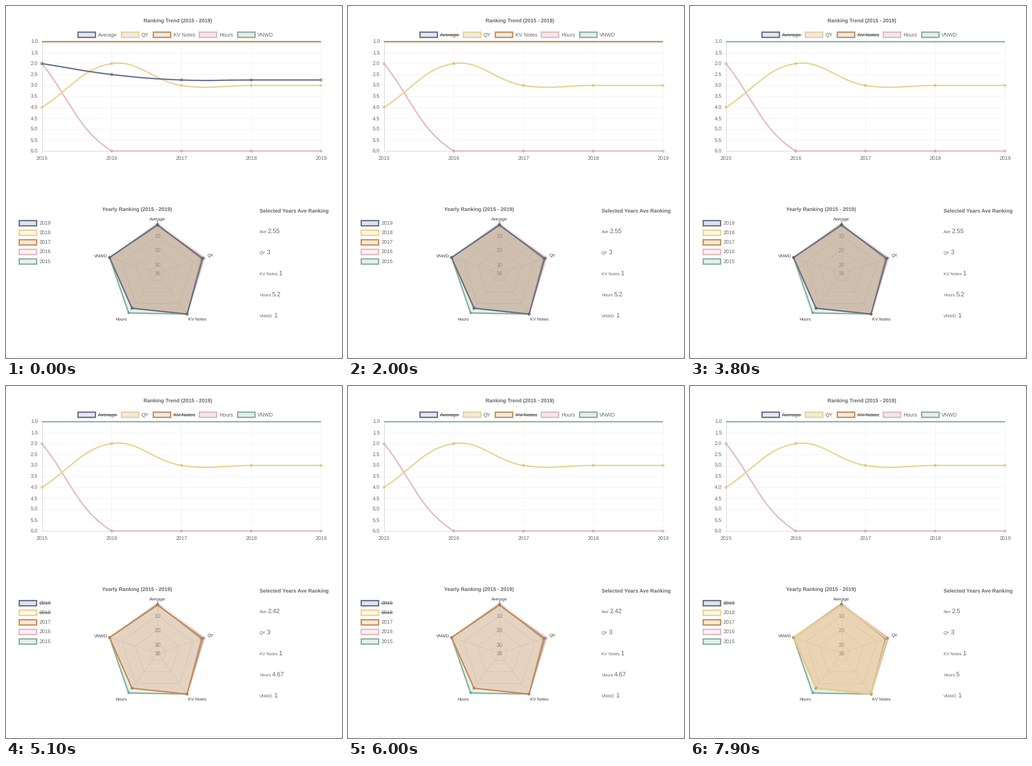
These frames come from a looping animation (640x668 px, 8 s). A matplotlib script:

```python
import numpy as np
import matplotlib.pyplot as plt
from matplotlib.animation import FuncAnimation
from matplotlib.patches import Circle, FancyBboxPatch, Polygon, Rectangle, PathPatch
from matplotlib.path import Path

W, H, DPI = 640, 668, 100
STEP, FRAMES = 100, 80
S = 0.826                      # chart units to pixels
PT = 72 / DPI
FONT, SMALL, LINE = 12 * S, 10 * S, 3 * S
GREY, GRID, WEB = "#666666", "#f2f2f2", "#e2e2e2"
FAINT = (0, 0, 0, 0.1)

SOURCES = ["Average", "QY", "KV Notes", "Hours", "VNWD"]
YEARS = [2015, 2016, 2017, 2018, 2019]
RANKS = np.array([
    [2, 2.5, 2.75, 2.75, 2.75],
    [4, 2, 3, 3, 3],
    [1, 1, 1, 1, 1],
    [2, 6, 6, 6, 6],
    [1, 1, 1, 1, 1],
])
STROKES = ["#666d8b", "#e9d28c", "#c98b51", "#e3b7c2", "#85b09d"]
FILLS = [(98, 115, 155), (250, 213, 125), (225, 140, 70),
         (255, 180, 190), (110, 190, 150)]

# (time in ms, legend label, visible afterwards)
CLICKS = [
    (1200, "Average", False),
    (2800, "KV Notes", False),
    (4000, "2019", False),
    (4900, "2018", False),
    (7200, "2018", True),
]

plt.rcParams["font.family"] = "Liberation Sans"
plt.rcParams["text.hinting"] = "none"

fig = plt.figure(figsize=(W / DPI, H / DPI), dpi=DPI, facecolor="#d4d4d4")
ax = fig.add_axes([0, 0, 1, 1])
ax.set_xlim(0, W)
ax.set_ylim(H, 0)
ax.axis("off")

parts = {}      # legend label -> artists of its data set
strikes = {}    # legend label -> strike-through line


def text(x, y, s, size=FONT, ha="left", color=GREY, z=2, **kw):
    """Text whose capitals are centred on y."""
    return ax.text(x, y + 0.36 * size, s, fontsize=size * PT, ha=ha,
                   va="baseline", color=color, zorder=z, **kw)


def line(xs, ys, color, width=1, z=1):
    return ax.plot(xs, ys, color=color, lw=width * PT, zorder=z,
                   solid_capstyle="butt")[0]


def dot(x, y, color, z):
    return ax.add_patch(Circle((x, y), 3 * S, fc=FAINT, ec=color,
                               lw=S * PT, zorder=z))


def legend_item(x, y, label, stroke, fill):
    ax.add_patch(Rectangle((x, y - 6 * S), 40 * S, 12 * S, fc=fill, ec=stroke,
                           lw=LINE * PT, joinstyle="miter", snap=False,
                           zorder=2))
    t = text(x + 46 * S, y, label)
    box = t.get_window_extent().transformed(ax.transData.inverted())
    strikes[label] = line([box.x0, box.x1], [y, y], GREY, 2 * S, 3)


def spline(pts, top, bottom, tension=0.4):
    """Smooth path through pts, control points held inside the plot."""
    n = len(pts)
    before, after = [], []
    for i, p in enumerate(pts):
        a, b = pts[max(i - 1, 0)], pts[min(i + 1, n - 1)]
        d0, d1 = np.hypot(*(p - a)), np.hypot(*(b - p))
        k = tension / (d0 + d1)
        for ctrl, out in ((p - k * d0 * (b - a), before),
                          (p + k * d1 * (b - a), after)):
            out.append((ctrl[0], np.clip(ctrl[1], top, bottom)))
    verts, codes = [pts[0]], [Path.MOVETO]
    for i in range(1, n):
        verts += [after[i - 1], before[i], pts[i]]
        codes += [Path.CURVE4] * 3
    return Path(verts, codes)


def draw_trend():
    left, right, top, bottom = 68.5, 600, 67.8, 275.2
    xs = np.linspace(left, right, 5)
    y_of = lambda v: top + (v - 1) * (bottom - top) / 5

    text(327.5, 27.5, "Ranking Trend (2015 - 2019)", ha="center", weight="bold")
    for x, name, color, shade in zip((137.2, 219.9, 280.6, 368.2, 441.3),
                                     SOURCES, STROKES,
                                     ("#e6e7ec",) + ("#ebebeb",) * 4):
        legend_item(x, 54.6, name, color, shade)

    for v in np.arange(1, 6.1, 0.5):
        y = y_of(v)
        line([left - 8, right], [y, y], GRID)
        text(60.5, y, f"{v:.1f}", ha="right")
    for x, year in zip(xs, YEARS):
        line([x, x], [top, bottom + 8], GRID)
        text(x, 289.5, str(year), ha="center")
    line([left, left], [top, bottom], "#d2d2d2", z=1.1)
    line([left, right], [bottom, bottom], "#d2d2d2", z=1.1)

    for i, (name, color, row) in enumerate(zip(SOURCES, STROKES, RANKS)):
        z = 10 - i
        pts = np.column_stack([xs, y_of(row)])
        curve = PathPatch(spline(pts, top, bottom), fc="none", ec=color,
                          lw=LINE * PT, capstyle="butt", zorder=z)
        parts[name] = [ax.add_patch(curve)]
        if row.max() > 1:
            parts[name] += [dot(*p, color, z + 0.5) for p in pts]


def draw_radar():
    cx, cy, unit, worst = 288.5, 507, 2.743, 36
    angles = np.arange(5) * 2 * np.pi / 5

    def corners(values):
        r = (worst - np.asarray(values)) * unit
        return np.column_stack([cx + r * np.sin(angles),
                                cy - r * np.cos(angles)])

    text(250, 385.5, "Yearly Ranking (2015 - 2019)", ha="center", weight="bold")
    for x, y in corners([1] * 5):
        line([cx, x], [cy, y], WEB)
    for v in (1, 10, 20, 30):
        ax.add_patch(Polygon(corners([v] * 5), fc="none", ec=WEB,
                             lw=PT, zorder=1))
    for v in (1, 10, 20, 30, 36):
        text(cx, cy - (worst - v) * unit, str(v), 11, "center", z=3,
             bbox=dict(fc=(1, 1, 1, 0.75), ec="none", pad=0.8))

    places = [(288.5, 404.5, "center"), (384, 474, "left"),
              (347.3, 594, "left"), (230, 594, "right"), (193.3, 474, "right")]
    for (x, y, ha), name in zip(places, SOURCES):
        text(x, y, name, SMALL, ha, "#3c3c3c", z=4)

    for i, (stroke, rgb) in enumerate(zip(STROKES, FILLS)):
        label, z = str(YEARS[-1 - i]), 10 - i
        fill = tuple(c / 255 for c in rgb) + (0.2,)
        legend_item(25.2, 412.2 + 22 * S * i, label, stroke, fill)
        pts = corners(RANKS[:, -1 - i])
        parts[label] = [
            ax.add_patch(Polygon(pts, fc=fill, ec="none", zorder=z)),
            ax.add_patch(Polygon(pts, fc="none", ec=stroke, lw=LINE * PT,
                                 joinstyle="miter", zorder=z + 0.2)),
        ]
        parts[label] += [dot(*p, FAINT, z + 0.5) for p in pts]


def draw_averages():
    text(483, 388, "Selected Years Ave Ranking", weight="bold")
    out = []
    for i, (name, x) in enumerate(zip(["Ave"] + SOURCES[1:],
                                      (498.3, 496.6, 519.4, 507, 509.8))):
        base = 431.3 + 40 * i
        text(483, base - 0.36 * 8.2, name, 8.2)
        out.append(text(x, base - 0.36 * 12, "", 12))
    return out


ax.add_patch(FancyBboxPatch((0, 0), W, H, fc="white", ec="none", zorder=0,
                            boxstyle="round,pad=0,rounding_size=4"))
line([17, W], [665, 665], "#ececec")
draw_trend()
draw_radar()
averages = draw_averages()


def update(frame):
    shown = dict.fromkeys(parts, True)
    for start, label, visible in CLICKS:
        if frame * STEP >= start:
            shown[label] = visible
    for label, artists in parts.items():
        for artist in artists:
            artist.set_visible(shown[label])
        strikes[label].set_visible(not shown[label])
    picked = [shown[str(year)] for year in YEARS]
    for label, mean in zip(averages, RANKS[:, picked].mean(axis=1)):
        label.set_text(f"{mean:.2f}".rstrip("0").rstrip("."))
    return []


anim = FuncAnimation(fig, update, frames=FRAMES, interval=STEP,
                     repeat=True, repeat_delay=0, blit=False)
plt.show()
```
